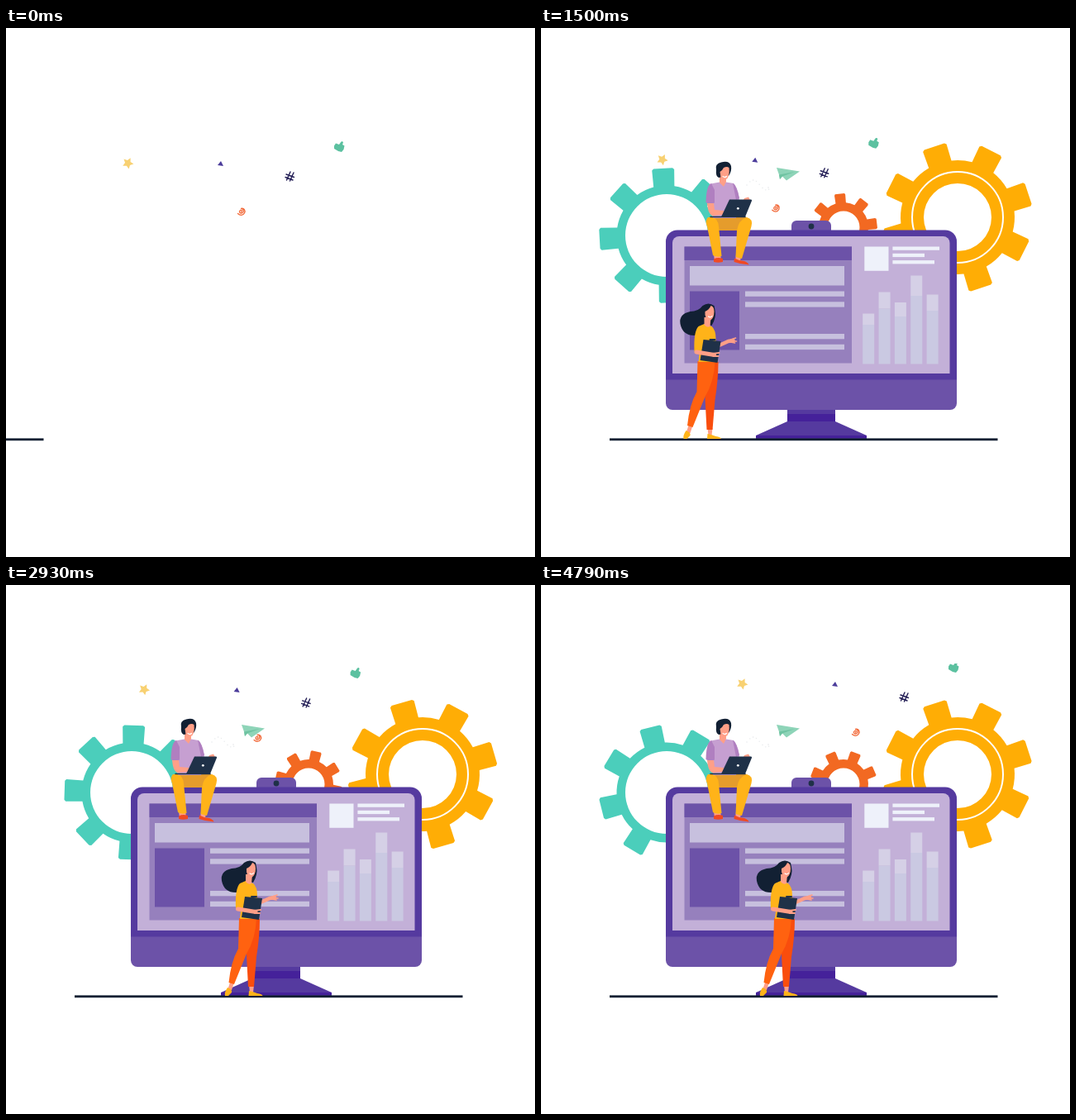
Recreate the animation shown at these times as an HTML page with a canvas. Size 640 by 640 pixels, loop 4.87 s.

```html
<!DOCTYPE html>
<html lang="en">
<head>
<meta charset="utf-8">
<title>Team at work</title>
<style>
  html, body { margin: 0; width: 100%; height: 100%; overflow: hidden; background: #fff; }
  canvas { display: block; width: 640px; height: 640px; }
</style>
</head>
<body>
<canvas id="stage" width="640" height="640"></canvas>
<script>
const ctx = document.getElementById('stage').getContext('2d');
const LOOP = 4870, FPS = 14, LAST = 67;
const TOP = 95; // everything above this edge is cropped

const C = {
  frame: '#553a9f', chin: '#6c52a8', band: '#45219a', screen: '#c3b0d8',
  panel: '#9680bd', pale: '#c7c0de', white: '#eef1fa', navy: '#122033',
  slate: '#1f3148', skin: '#ff9f87', yellow: '#ffb319', red: '#f04a23'
};

const clamp = v => Math.max(0, Math.min(1, v));
const progress = (f, from, to) => clamp((f - from) / (to - from));
const easeOut = p => 1 - (1 - p) ** 2;

// Smooth curve through [time, value] knots
function curve(knots, t) {
  let i = 0;
  while (i < knots.length - 2 && t > knots[i + 1][0]) i++;
  const at = k => knots[Math.max(0, Math.min(knots.length - 1, k))];
  const slope = k => (at(k + 1)[1] - at(k - 1)[1]) / (at(k + 1)[0] - at(k - 1)[0]);
  const [t0, a] = at(i), [t1, b] = at(i + 1);
  const d = t1 - t0, u = (t - t0) / d, v = 1 - u;
  return v * v * (1 + 2 * u) * a + u * v * v * d * slope(i)
       + u * u * (3 - 2 * u) * b - u * u * v * d * slope(i + 1);
}

function rect(color, x0, y0, x1, y1) {
  ctx.fillStyle = color;
  ctx.fillRect(x0, y0, x1 - x0, y1 - y0);
}

function rounded(color, x0, y0, x1, y1, radii) {
  ctx.fillStyle = color;
  ctx.beginPath();
  ctx.roundRect(x0, y0, x1 - x0, y1 - y0, radii);
  ctx.fill();
}

function dot(color, x, y, r) {
  ctx.fillStyle = color;
  ctx.beginPath();
  ctx.arc(x, y, r, 0, 2 * Math.PI);
  ctx.fill();
}

function shape(color, d) {
  ctx.fillStyle = color;
  ctx.fill(new Path2D(d));
}

function line(color, width, d) {
  ctx.strokeStyle = color;
  ctx.lineWidth = width;
  ctx.lineCap = ctx.lineJoin = 'round';
  ctx.stroke(new Path2D(d));
}

function layer(dx, dy, alpha, draw) {
  if (alpha <= 0) return;
  ctx.save();
  ctx.translate(dx, dy);
  ctx.globalAlpha = alpha;
  draw();
  ctx.restore();
}

function gear(color, outer, root, hole, degrees) {
  const teeth = 8, step = 2 * Math.PI / teeth;
  ctx.beginPath();
  for (let i = 0; i < teeth; i++) {
    const mid = degrees * Math.PI / 180 + i * step;
    for (const [r, a] of [[root, -.21], [outer - 1.5, -.168], [outer, -.14], [outer, .14], [outer - 1.5, .168], [root, .21]])
      ctx.lineTo(r * Math.cos(mid + a), r * Math.sin(mid + a));
    ctx.arc(0, 0, root, mid + .21, mid + step - .21);
  }
  ctx.closePath();
  ctx.moveTo(hole, 0);
  ctx.arc(0, 0, hole, 0, 2 * Math.PI);
  ctx.fillStyle = color;
  ctx.fill('evenodd');
}

function drawGears(f) {
  const turn = f - 16;
  layer(366, 241, progress(f, 9, 14), () => gear('#f26922', 41, 30, 19.5, 11 + 5.5 * turn));
  layer(504, 229, progress(f, 12.2, 18.2), () => {
    gear('#ffad05', 91, 69, 41, 37.5 + 6.85 * turn);
    ctx.strokeStyle = '#fff';
    ctx.lineWidth = 2;
    ctx.beginPath();
    ctx.arc(0, 0, 55, 0, 2 * Math.PI);
    ctx.stroke();
  });
  layer(152, 251, progress(f, 14.7, 20.7), () => gear('#4bcebb', 82, 60.5, 50, 29.4 + 11.5 * turn));
}

function drawPlane() {
  shape('#8ed4b8', 'M285 169L313 173.5L297 184.5L292 179.5L289 183L288 177.5Z');
  shape('#6fc3a2', 'M288 177.5L307 174L292 179.5L289 183Z');
  for (let i = 0; i < 8; i++)
    dot('#e3e6e8', 249 + 3.8 * i, 190 - 6 * Math.sin(i * .75), .7);
  dot('#e3e6e8', 275, 193, .8);
}

function drawItems() {
  ctx.fillStyle = '#f8d172';
  ctx.beginPath();
  for (let i = 0; i < 10; i++) {
    const r = i % 2 ? 3.5 : 7, a = i * Math.PI / 5 + .15;
    ctx.lineTo(147.5 + r * Math.cos(a), 163.5 + r * Math.sin(a));
  }
  ctx.fill();
  shape('#4b3c9b', 'M256 166L260 161L263 167Z');
  line('#221d55', 1.4, 'M344 174L339.5 184M348 175L343.5 185M339 177L348.5 180.5M338 180.5L347 184');
  line('#f26a3a', 1.3, 'M284.5 222.5C286 221 285 219.500 283.500 220.500C281.500 222 282.500 224.500 285 224C288.500 223 287.500 218 284.500 218.300M284.500 218.300C288 217.500 290 221 288.500 223.800C287 227 283 227 280.500 224.500');
  shape('#5cc1a0', 'M397 142.500L399 139.500L403 141L405.500 137.500Q407.500 136.500 408 138.500L407 141L409.500 142.500L408.500 147L406 150L402 149L397 146Z');
}

function drawMonitor() {
  rect(C.frame, 298, 461, 356, 477);
  rect(C.band, 298, 467, 356, 476);
  shape(C.frame, 'M298 476H356L394 493V497H260V493Z');
  rect(C.band, 260, 493, 394, 497);
  rounded(C.chin, 303, 233, 351, 250, 6);
  dot(C.slate, 327, 240, 3.4);
  rounded(C.frame, 151, 244.5, 503, 440, [14, 14, 0, 0]);
  rounded(C.chin, 151, 425.5, 503, 462, [0, 0, 8, 8]);
  rounded(C.screen, 159, 252, 494.5, 418, [8, 8, 0, 0]);

  rect(C.panel, 173.5, 264.5, 376, 405.5);
  rect(C.chin, 173.5, 264.5, 376, 281);
  rect(C.pale, 180, 288, 367, 311.5);
  rect(C.chin, 180, 318.5, 240, 389.5);
  for (const y of [318.5, 331.3, 370, 382.8]) rect(C.pale, 247, y, 367, y + 6.3);

  rect(C.white, 391.3, 264.5, 420.5, 293.8);
  [482, 464, 476].forEach((right, i) =>
    rect(C.white, 425.4, 264.5 + 8.3 * i, right, 268.8 + 8.3 * i));
  [[345.5, 359], [319.5, 339.5], [332, 349], [299.5, 324], [322.5, 342]].forEach(([top, split], i) => {
    const x = 389.2 + 19.35 * i;
    rect('#cac9e2', x, split, x + 14, 406.5);
    rect('#d5d0e6', x, top, x + 14, split);
  });
}

function drawMan() {
  shape('#e59c2c', 'M204 229H249L242 245H212Z');
  shape(C.skin, 'M209 274H217L218 281H210ZM236 274L242 276L241 282H235Z');
  shape(C.red, 'M209 279.500Q214 277 220 279V283Q214 284.500 209 283ZM234 278.500Q240 282 246 282Q251 284 251.500 286.500Q242 286 233.500 283Z');
  shape(C.yellow, 'M202 229Q198 233 201 240L208 275Q213 278 218.500 276L215 240Q214 230 207 229Z');
  shape(C.yellow, 'M249 229Q257 231 254.500 240L243 279L235.500 277L237 245Q239 232 249 229Z');
  shape('#c69fd1', 'M205 188.500L216 186.500H224L233 188Q237 191 240 206L236 230H208Z');
  shape('#b07fc0', 'M206 188Q200 190 199.500 211Q204 214 210 211.500L210 196Z');
  shape('#b07fc0', 'M232 187.500Q237 191 240 206L236 208Z');
  shape(C.skin, 'M216 179H224V186L221 192L216 187Z');
  shape(C.skin, 'M201 212H209L210 220L221 221V226L207 227Q202 225 201 212ZM246 206L251 204.500L253 208H245Z');
  shape(C.navy, 'M212 172Q210 164 218 162.500Q228 160 230 167Q231 173 227 179L215 181Q211 179 212 172Z');
  shape(C.skin, 'M216.500 174Q219 173 221 169Q225 167 227.500 169Q228.500 177 225.500 182Q221.500 185 217.500 181Z');
  line('#fff', 1.2, 'M220 179.500Q222.500 181.500 224.500 179.500');
  shape(C.slate, 'M228 207.500H254Q255.500 207.500 255 209L247 228.500H218Z');
  line(C.slate, 1.5, 'M205 228.500H247');
  dot('#fff', 238.3, 218.3, 1.4);
}

function drawWoman() {
  shape(C.navy, 'M302 336Q295 331 288 336Q283 343 273 343Q259 346 261 358Q264 373 280 372Q290 369 292 358L299 360Q305 350 303 341Z');
  shape(C.skin, 'M271 481H276L273 490H268ZM294 484H300L299 493H295Z');
  shape(C.yellow, 'M268 487Q274 489 273 493L269 497H265Q264 493 268 487ZM294 491Q299 492 304 494Q310 495 310.500 497H293.500Z');
  shape('#f94d0d', 'M289 404H307Q307 425 303 450L300 486H293L291 448Z');
  shape('#ff6210', 'M282 403H303Q302 428 291 446L276 483L269.500 481Q272 456 281 440Z');
  shape(C.yellow, 'M283 361L290 358L299 361Q304 365 304 376L306 404H283L284 394L278 391Q277 367 283 361Z');
  shape(C.skin, 'M290 350H298L297 361Q293 363 290 359Z');
  shape(C.skin, 'M291 343Q296 341 298 336Q302 337 302 343Q302 351 297 354Q290 352 291 343Z');
  line('#fff', 1.2, 'M295 349Q297.500 351 299.500 348.500');
  line(C.skin, 4.5, 'M308 384L319 379L325 378');
  line(C.skin, 1.6, 'M322 377L328 375M323 379H329M322 380L327 381');
  shape(C.slate, 'M289 377L310 379L306 405L285 402Z');
  line(C.slate, 2, 'M297 377H303');
  line(C.skin, 5, 'M280.500 392L302 395.500');
  line(C.skin, 2, 'M300 394L308 393M301 397L307 397');
}

const driftX = [[0, 0], [8, -19.5], [16, 36.5], [26, -36], [34, 34], [49, 2], [67, 96]];
const driftY = [[0, 0], [8, -16], [16, -7], [20, -4], [24, -7], [26, -12],
                [34, -20], [40, -36], [48, -38.5], [49, -40], [57, -45], [67, -44]];

function render(f) {
  ctx.fillStyle = '#fff';
  ctx.fillRect(0, 0, 640, 640);
  ctx.save();
  ctx.beginPath();
  ctx.rect(0, TOP, 640, 640 - TOP);
  ctx.clip();

  drawGears(f);
  layer(0, 0, progress(f, 12, 15), drawPlane);
  layer(curve(driftX, f), curve(driftY, f), 1, drawItems);
  layer(0, 0, progress(f, 1, 7), drawMonitor);
  layer(-507 * (1 - easeOut(progress(f, 0, 6))), 0, 1, () => rect(C.navy, 83, 496.4, 552.5, 499.2));
  layer(0, -192 * (1 - easeOut(progress(f, 7.2, 13.8))), 1, drawMan);
  layer(-330 * (1 - easeOut(progress(f, 17, 25.5))), 0, 1, drawWoman);
  ctx.restore();
}

function tick() {
  const t = performance.now() % LOOP;
  render(Math.min(LAST, Math.floor((t + 5) * FPS / 1000)));
  requestAnimationFrame(tick);
}
tick();
</script>
</body>
</html>
```
